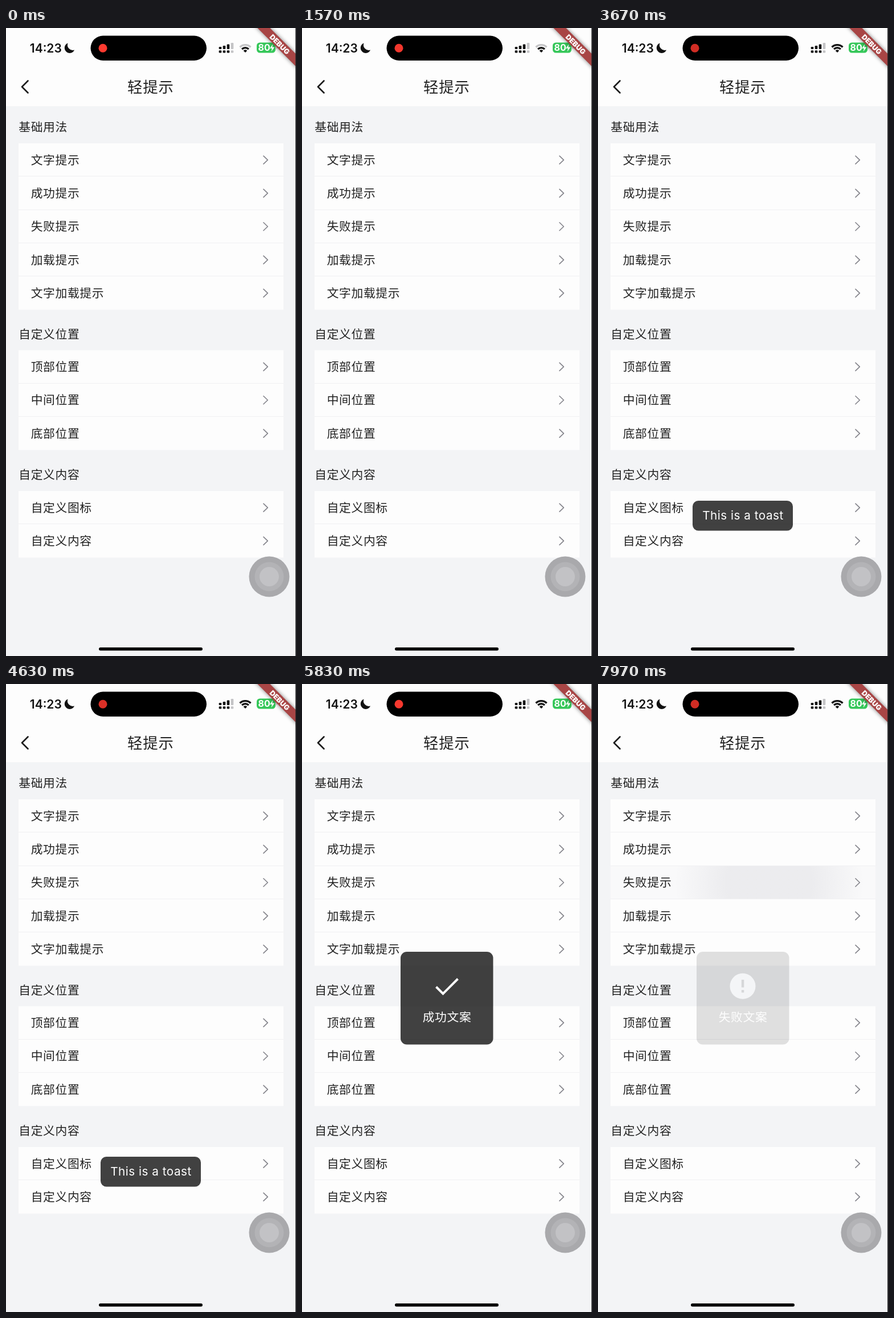
An HTML page that plays this animation: 509 px wide and 1100 px high, repeating every 8000 ms.

```html
<!DOCTYPE html>
<html lang="zh-CN">
<head>
<meta charset="utf-8">
<title>轻提示</title>
<style>
  html, body { margin: 0; width: 100%; height: 100%; overflow: hidden; background: #f3f4f6; }
  svg { display: block; width: 509px; height: 1100px; }
  svg svg { width: auto; height: auto; }
  text { font: 350 20.8px "Noto Sans CJK SC", "Noto Sans CJK", sans-serif; letter-spacing: .6px; fill: #222; }
  .title { font-size: 26.4px; letter-spacing: .9px; }
  .latin { font-family: Inter, Roboto, sans-serif; letter-spacing: 0; }
  .clock { font-size: 21px; font-weight: 600; fill: #111; }
  .charge { font-size: 16px; font-weight: 700; fill: #fff; }
  .banner { font-size: 12.5px; font-weight: 900; fill: #fff; }
  .toast text { fill: #fff; text-anchor: middle; }
  .toast .latin { font-size: 20.7px; font-weight: 400; letter-spacing: .5px; }
  .line { fill: none; stroke-linecap: round; stroke-linejoin: round; }
  .sharp { stroke-linecap: butt; stroke-linejoin: miter; }
</style>
</head>
<body>
<svg viewBox="0 0 509 1100">
  <defs>
    <radialGradient id="soft">
      <stop offset=".45" stop-color="#20203a"/>
      <stop offset="1" stop-color="#20203a" stop-opacity="0"/>
    </radialGradient>
    <filter id="shadow" x="-20%" y="-80%" width="140%" height="260%">
      <feGaussianBlur stdDeviation="3.5"/>
    </filter>
  </defs>

  <rect width="509" height="1100" fill="#f3f4f6"/>
  <rect width="509" height="137" fill="#fdfdfd"/>
  <path class="line" d="M38.5 92.5L28 103L38.5 113.5" stroke="#1c1c1c" stroke-width="2.7"/>
  <text class="title" x="213" y="112.5">轻提示</text>

  <g id="list"></g>

  <g id="status">
    <text class="latin clock" x="41.8" y="42.5">14:23</text>
    <path d="M108.5 26.5A9 9 0 1 0 120 38.5A9.3 9.3 0 0 1 108.5 26.5Z" fill="#111"/>
    <rect x="148.5" y="13.5" width="203.5" height="43.5" rx="21.75"/>
    <circle id="rec" cx="170" cy="35.3" r="7.5"/>
    <g id="signal"></g>
    <g class="line sharp" stroke="#111" stroke-width="3.4">
      <path id="wifi" d="M410.5 33.5A13.5 13.5 0 0 1 429.5 33.5"/>
      <path d="M414.1 37.1A8.3 8.3 0 0 1 425.9 37.1"/>
      <path d="M420 43L416.7 39.7A4.6 4.6 0 0 1 423.3 39.7Z" fill="#111" stroke="none"/>
    </g>
    <rect x="440" y="25.5" width="33" height="18" rx="5.5" fill="#35c759"/>
    <path d="M474.5 31.5q2.5 3 0 6z" fill="#aaa"/>
    <text class="latin charge" x="442.5" y="40.3">80</text>
    <path d="M468.5 28L463 35.8H467L465.5 41.5L471.5 33.5H467.3Z" fill="#fff"/>
  </g>

  <g id="ball">
    <circle cx="462" cy="961" r="35.5" fill="#a9a9ac"/>
    <circle cx="462" cy="961" r="25.5" fill="#b3b3b6"/>
    <circle cx="462" cy="961" r="17" fill="#c2c2c5"/>
  </g>
  <rect x="163" y="1085" width="182" height="5.5" rx="2.75"/>

  <g class="toast" opacity="0">
    <rect x="166" y="828" width="176" height="52.5" rx="10" fill-opacity=".74"/>
    <text class="latin" x="254.5" y="861">This is a toast</text>
  </g>
  <g class="toast" opacity="0">
    <rect x="173" y="469" width="162.5" height="162.5" rx="11" fill-opacity=".74"/>
    <path class="line sharp" d="M235.5 530.5L247.5 542.5L273.5 516.5" stroke="#fff" stroke-width="4"/>
    <text x="254.5" y="590.5">成功文案</text>
  </g>
  <g class="toast" opacity="0">
    <rect x="173" y="469" width="162.5" height="162.5" rx="11" fill-opacity=".74"/>
    <path fill="#fff" fill-rule="evenodd" d="M231.5 529.3a22.5 22.5 0 1 1 45 0a22.5 22.5 0 1 1 -45 0ZM251.8 518v13.5h4.5v-13.5ZM251.8 536v4.5h4.5v-4.5Z"/>
    <text x="254.5" y="590.5">失败文案</text>
  </g>

  <g transform="translate(509 0) rotate(45)">
    <rect x="-56" y="32.3" width="112" height="15.5" fill-opacity=".5" filter="url(#shadow)"/>
    <rect x="-56" y="32.3" width="112" height="15.5" fill="#a84545"/>
    <text class="latin banner" x="0" y="45" text-anchor="middle">DEBUG</text>
  </g>
  <rect x="508" width="1" height="1100" fill="#2a2a2c"/>
</svg>

<script>
const LOOP = 8000, ROW = 58.3;
const sections = [
  ['基础用法', 173, 202, ['文字提示', '成功提示', '失败提示', '加载提示', '文字加载提示']],
  ['自定义位置', 536, 564.3, ['顶部位置', '中间位置', '底部位置']],
  ['自定义内容', 782, 811, ['自定义图标', '自定义内容']]
];
const taps = [2755, 5198, 7800];
const byId = id => document.getElementById(id);

function row(label, i, top) {
  const y = top + i * ROW, mid = y + ROW / 2;
  const divider = i ? `<rect x="22" y="${Math.round(y) - 1}" width="465" height="1" fill="#f0f0f2"/>` : '';
  return `${divider}<text x="43.7" y="${mid + 7.6}">${label}</text>
    <path class="line" d="M452 ${mid - 7}l7.3 7l-7.3 7" stroke="#85858c" stroke-width="1.7"/>`;
}

// a pressed row: an even tint with a spreading ripple clipped to the row
const press = (top, i) => `<svg class="press" x="22" y="${top + i * ROW}" width="465" height="${ROW}" style="width:465px;height:${ROW}px">
    <rect width="465" height="${ROW}" fill="#20203a" opacity=".015"/>
    <circle cy="${ROW / 2}" r="0" fill="url(#soft)" opacity=".06"/></svg>`;

byId('list').innerHTML = sections.map(([head, y, top, labels], n) => `
  <text x="22.3" y="${y + 7.6}">${head}</text>
  <rect x="22" y="${top}" width="465" height="${labels.length * ROW}" fill="#fdfdfd"/>
  ${n ? '' : taps.map((_, i) => press(top, i)).join('')}
  ${labels.map((label, i) => row(label, i, top)).join('')}`).join('');

byId('signal').innerHTML = [4, 6, 8.5, 11].map((h, i) => {
  const x = 373.7 + i * 7, fill = i < 3 ? '#111' : '#c4c4c6';
  return `<rect x="${x}" y="${37 - h}" width="4.6" height="${h}" rx="1.2" fill="${fill}"/>
    <rect x="${x}" y="39.2" width="4.6" height="4.3" rx="1.2" fill="${fill}"/>`;
}).join('');

const presses = document.querySelectorAll('.press');
const toasts = document.querySelectorAll('.toast');
const clamp = v => Math.max(0, Math.min(1, v));
const mix = (a, b, p) => a + (b - a) * p;

function drawTap(start, i, t) {
  const age = t - start, spread = clamp(age / 300);
  const ripple = presses[i].querySelector('circle');
  ripple.setAttribute('r', mix(30, 270, spread));
  ripple.setAttribute('cx', mix(341, 232, spread));
  presses[i].setAttribute('opacity', clamp(age / 25) * (1 - clamp((age - 260) / 300)));

  // the toast eases in just after the tap, stays two seconds, then fades
  const shown = age - 58;
  const fadeIn = clamp(shown / 300) ** 1.9;
  toasts[i].setAttribute('opacity', fadeIn * (1 - clamp((shown - 2000) / 300)));
}

function draw(t) {
  taps.forEach((start, i) => drawTap(start, i, t));
  const glow = .5 + .5 * Math.cos((t - 2770) / 1433 * 2 * Math.PI);
  byId('rec').setAttribute('fill',
    `rgb(${mix(200, 255, glow)},${mix(42, 59, glow)},${mix(34, 48, glow)})`);
  byId('wifi').setAttribute('stroke', t < 3300 ? '#c4c4c6' : '#111');
}

const began = performance.now();
function tick() {
  draw((performance.now() - began) % LOOP);
  requestAnimationFrame(tick);
}
tick();
</script>
</body>
</html>
```
